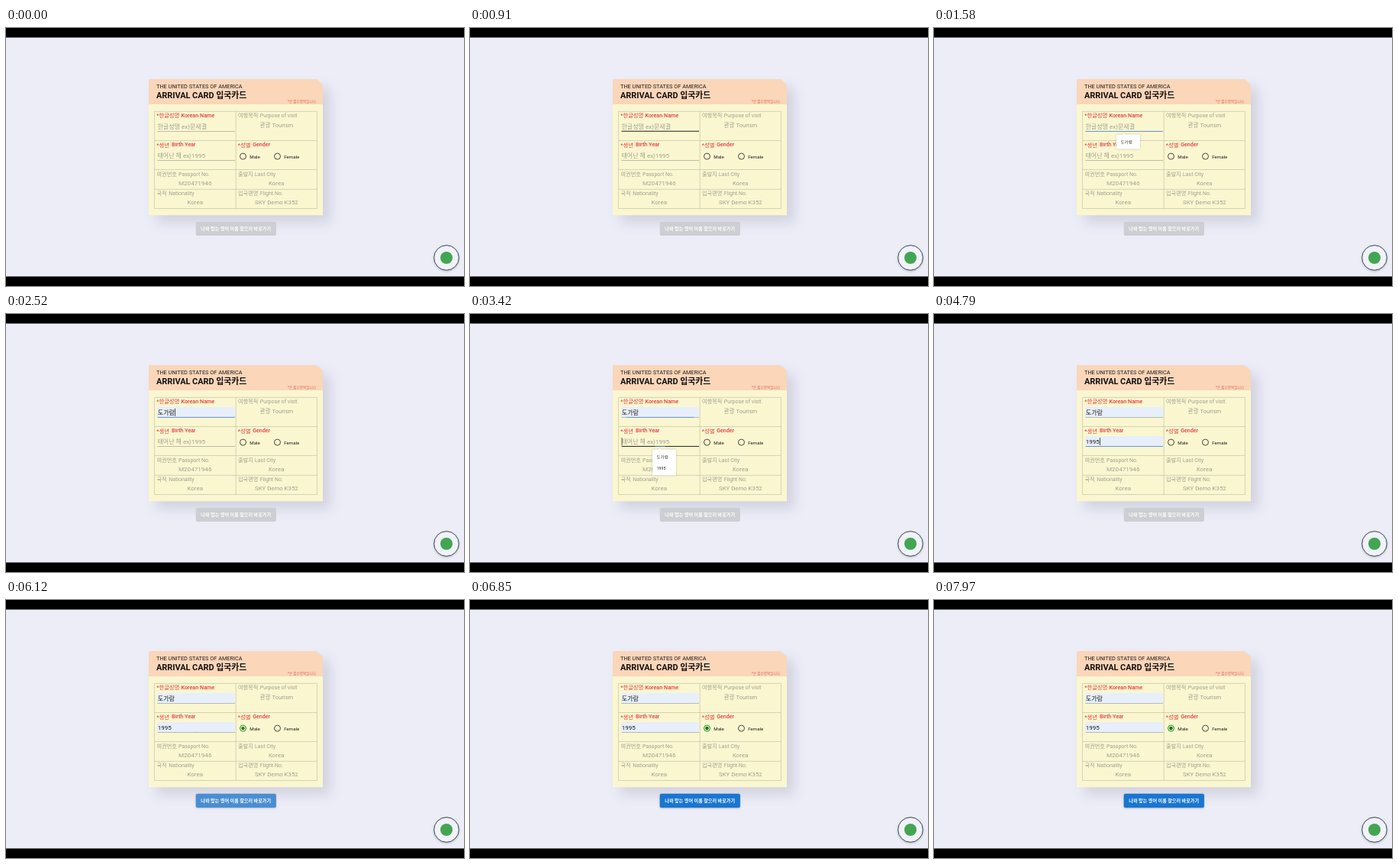
An HTML page for the animation above (8 s loop, 600 by 338 pixels).

```html
<!DOCTYPE html>
<html lang="ko">
<head>
<meta charset="utf-8">
<title>Arrival card</title>
<style>
html, body { margin: 0; width: 100%; height: 100%; overflow: hidden; background: #000; }
svg { display: block; width: 100vw; height: 100vh; }
text { font-family: Roboto, "Noto Sans CJK KR", "Noto Sans CJK", sans-serif; }
.card { filter: drop-shadow(10px 10px 8px rgba(40, 40, 70, .13)); }
.grid { fill: none; stroke: #c4c3ad; stroke-width: .7; }
.pop path { fill: #fff; filter: drop-shadow(0 .5px 1.2px rgba(0, 0, 0, .22)); }
.chat { fill: #f0f3fa; stroke: #3a4452; stroke-width: 1; filter: drop-shadow(0 1px 1.5px rgba(0, 0, 0, .2)); }
</style>
</head>
<body>
<svg id="stage" viewBox="0 0 600 338" preserveAspectRatio="none">
  <rect width="600" height="338"/>
  <rect y="12.5" width="600" height="313" fill="#ecedf7"/>
  <g class="card">
    <path d="M187 67H407L415 74V245.3H187Z" fill="#faf7d0"/>
    <path d="M187 67H407L415 74V100H187Z" fill="#fbd6b9"/>
  </g>
  <path class="grid" d="M194.5 109.3H407.5V236.5H194.5ZM301.2 109.3V236.5M194.5 147.5H407.5M194.5 185.5H407.5M194.5 211.3H407.5"/>
  <g id="labels"></g>
  <g id="fields"></g>
  <g id="radios"></g>
  <g id="button"></g>
  <g id="popups"></g>
  <circle class="chat" cx="577" cy="301" r="16.3"/>
  <circle cx="577" cy="301" r="8" fill="#43a551"/>
</svg>
<script>
const LOOP = 8000;
const PERSON = "도가람";
const RED = "#e8383a", GRAY = "#a09f92", INK = "#1c1c1c", BLUE = "#1976d2", LINE = "#4f8ed8", GREEN = "#0b7d14";
const TIME = { birth: 3412, blur: 5960, male: 6020 };

const $ = id => document.getElementById(id);

function add(parent, tag, attrs) {
  const el = document.createElementNS("http://www.w3.org/2000/svg", tag);
  for (const k in attrs) el.setAttribute(k, attrs[k]);
  return parent.appendChild(el);
}

function write(parent, str, x, y, size, fill, weight = 400, extra = {}) {
  const el = add(parent, "text", { x, y, "font-size": size, fill, "font-weight": weight, ...extra });
  el.textContent = str;
  return el;
}

const clamp = v => Math.max(0, Math.min(1, v));
const easeOut = p => 1 - (1 - clamp(p)) ** 3;
const show = (el, on) => el.setAttribute("visibility", on ? "visible" : "hidden");

// Static text: string, x, baseline, size, colour, weight
const labels = $("labels");
[
  ["THE UNITED STATES OF AMERICA", 197, 79.2, 7.35, INK],
  ["ARRIVAL CARD 입국카드", 197, 92.3, 10.9, "#111", 700],
  ["*은 필수항목입니다", 369, 97.6, 4.6, "#d9675a"],
  ["*한글성명", 197.3, 117.3, 7.3, RED],
  ["Korean Name", 229.5, 117.2, 7.2, RED, 500],
  ["여행목적", 304, 117.3, 7.2, GRAY],
  ["Purpose of visit", 332.8, 117.2, 7.05, GRAY],
  ["관광 Tourism", 332.5, 129.5, 7.65, GRAY],
  ["*생년", 197.3, 155.5, 7.3, RED],
  ["Birth Year", 217, 155.4, 7.1, RED, 500],
  ["*성별", 303.8, 155.5, 7.3, RED],
  ["Gender", 323.3, 155.4, 7, RED, 500],
  ["Male", 319.3, 170.5, 6.2, INK],
  ["Female", 364.2, 170.5, 6.2, INK],
  ["여권번호", 197.5, 193.6, 7.2, GRAY],
  ["Passport No.", 226, 193.5, 7, GRAY],
  ["M20471946", 226, 206, 8.1, GRAY],
  ["출발지", 304, 193.6, 7.2, GRAY],
  ["Last City", 326, 193.5, 7, GRAY],
  ["Korea", 344, 206, 7.9, GRAY],
  ["국적", 197.5, 218.8, 7.2, GRAY],
  ["Nationality", 213.2, 218.7, 7, GRAY],
  ["Korea", 237.5, 231.2, 7.9, GRAY],
  ["입국편명", 304, 218.8, 7.2, GRAY],
  ["Flight No.", 332.8, 218.7, 7, GRAY],
  ["SKY Demo K352", 326, 231.2, 7.8, GRAY]
].forEach(row => write(labels, ...row));

function makeField({ y, hint, value, hover, focus, pick, blur, caretX }) {
  const g = add($("fields"), "g", {});
  const fill = add(g, "rect", { x: 198, y: y - 14, width: 102, height: 13.5, fill: "#e7eefc" });
  const ghost = write(g, hint, 198.5, y - 4, 8, GRAY);
  const typed = write(g, value, 198.8, y - 4, 8, INK);
  const base = add(g, "rect", { x: 198.5, width: 101.5 });
  const line = add(g, "rect", { y: y - .9, height: .8, fill: LINE });
  const caret = add(g, "rect", { y: y - 12, width: .7, height: 10, fill: "#111" });
  return t => {
    const filled = t >= pick, active = t >= focus && t < blur;
    const dark = t >= hover && t < focus + 200;
    show(fill, filled);
    show(typed, filled);
    show(ghost, !filled);
    base.setAttribute("y", dark ? y - 1.1 : y - .8);
    base.setAttribute("height", dark ? 1.1 : .7);
    base.setAttribute("fill", dark ? "#333" : "#a2a297");
    const grow = t < blur ? easeOut((t - focus) / 200) : 1 - easeOut((t - blur) / 200);
    line.setAttribute("x", 249.2 - 50.75 * grow);
    line.setAttribute("width", 101.5 * grow);
    const since = t - (filled ? pick : focus);
    show(caret, active && since % 1000 < 500);
    caret.setAttribute("x", filled ? caretX : 198.7);
  };
}

function makePopup(y, items, from, to) {
  const g = add($("popups"), "g", { class: "pop" });
  add(g, "path", { d: `M239 ${y}H246.5L248.7 ${y - 2.2}L250.9 ${y}H270V${y + 4 + 15 * items.length}H239Z` });
  items.forEach((s, i) => write(g, s, 244.7, y + 11.4 + 15 * i, 5, "#222", 400,
    { "letter-spacing": /\d/.test(s) ? 0.1 : 0.5 }));
  return t => show(g, t >= from && t < to);
}

function makeRadio(cx, start) {
  const g = $("radios");
  const ring = add(g, "circle", { cx, cy: 168.1, r: 4, fill: "none", "stroke-width": .9 });
  const dot = add(g, "circle", { cx, cy: 168.1, fill: GREEN });
  return t => {
    ring.setAttribute("stroke", t >= start ? GREEN : "#333");
    dot.setAttribute("r", 2.3 * easeOut((t - start) / 150));
  };
}

function makeButton(start) {
  const g = $("button");
  const box = { x: 248.7, y: 253.7, width: 105.2, height: 18.2, rx: 2 };
  add(g, "rect", { ...box, fill: "#cdced3" });
  const blue = add(g, "rect", { ...box, fill: BLUE, style: "filter:drop-shadow(0 1px 1px rgba(0,0,0,.25))" });
  write(g, "나와 맞는 영어 이름 찾으러 바로가기", 301.2, 265, 6.1, "#fff", 700, { "text-anchor": "middle" });
  return t => {
    const p = clamp((t - start) / 250), k = p * p * (3 - 2 * p);
    blue.setAttribute("opacity", 1 - (1 - k) ** 2);
  };
}

const parts = [
  makeField({ y: 135.8, hint: "한글성명 ex)문새결", value: PERSON,
    hover: 850, focus: 1010, pick: 2420, blur: TIME.birth, caretX: 221.2 }),
  makeField({ y: 174, hint: "태어난 해 ex)1995", value: "1995",
    hover: 3150, focus: TIME.birth, pick: 4500, blur: TIME.blur, caretX: 217 }),
  makePopup(139.4, [PERSON], 1030, 2420),
  makePopup(177.6, [PERSON, "1995"], TIME.birth, 4500),
  makeRadio(310.5, TIME.male),
  makeRadio(355.5, Infinity),
  makeButton(TIME.male - 20)
];

function frame() {
  const t = performance.now() % LOOP;
  parts.forEach(draw => draw(t));
  requestAnimationFrame(frame);
}
frame();
</script>
</body>
</html>
```
